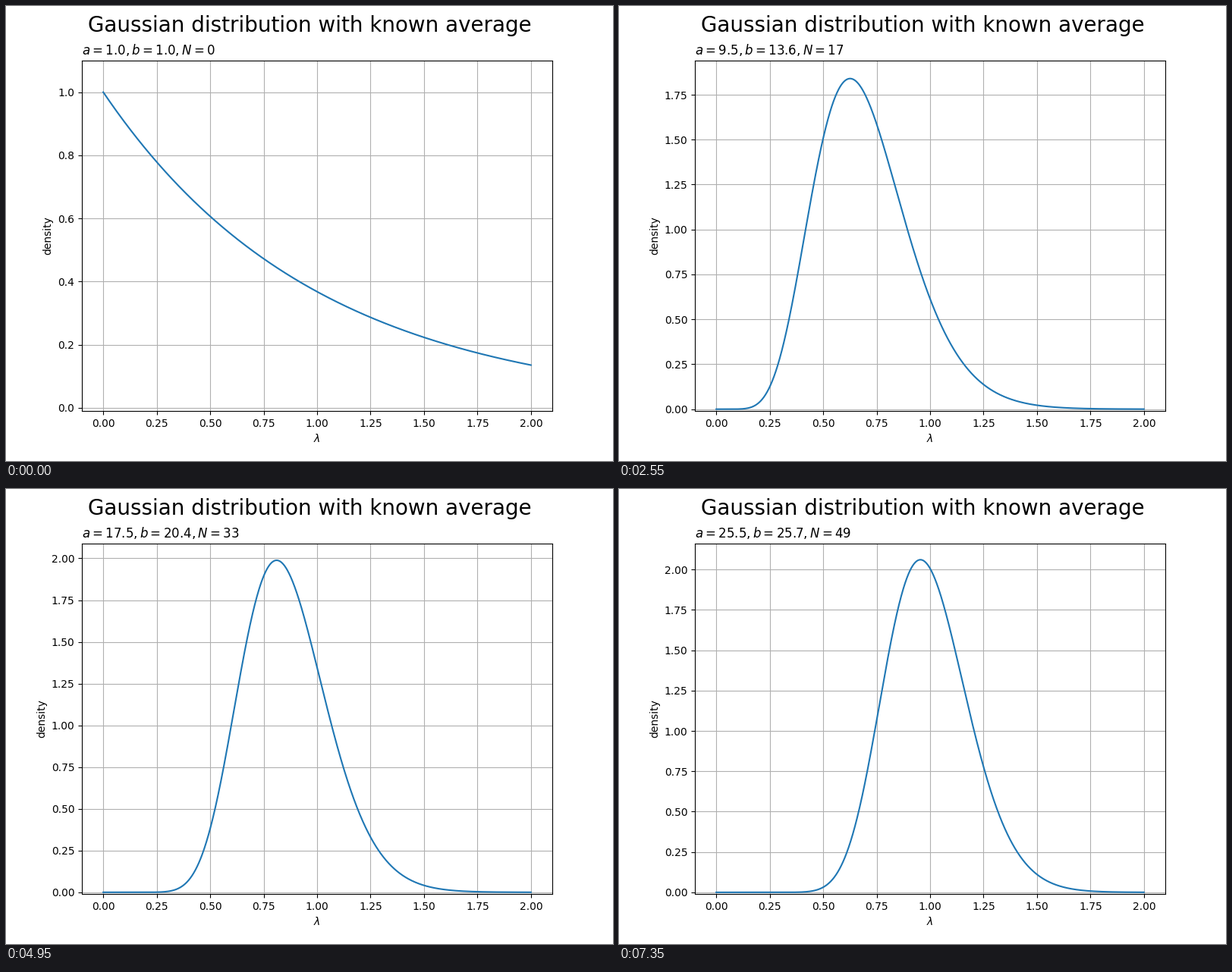
A matplotlib script that plays this animation: 800 by 600 pixels, repeating every 7.5 s.

```python
import math

import matplotlib.pyplot as plt
import numpy as np
from matplotlib.animation import FuncAnimation

STEPS = 50
INTERVAL = 150

# Rate of the gamma posterior over the precision, after N observations
COUNTS = [0, 12, 22, 29, 37, 42, 49]
RATES = [1.0, 12.16, 15.0, 19.53, 21.17, 22.9, 25.66]

lam = np.linspace(0, 2, 1000)


def gamma_pdf(x, a, b):
    return b**a * x**(a - 1) * np.exp(-b * x) / math.gamma(a)


fig, ax = plt.subplots(figsize=(8, 6), dpi=100)
fig.suptitle("Gaussian distribution with known average", fontsize=20)
line, = ax.plot(lam, gamma_pdf(lam, 1, 1))
title = ax.set_title("", loc="left", fontsize=12)
ax.set_xlabel(r"$\lambda$")
ax.set_ylabel("density")
ax.set_xlim(-0.1, 2.1)
ax.grid(True)


def update(n):
    a = 1 + n / 2
    b = np.interp(n, COUNTS, RATES)
    density = gamma_pdf(lam, a, b)
    line.set_ydata(density)
    ax.set_ylim(-0.01, density.max() + 0.1)
    title.set_text(f"$a={a:.1f}, b={b:.1f}, N={n}$")
    return line, title


anim = FuncAnimation(fig, update, frames=STEPS, interval=INTERVAL,
                     repeat=True, repeat_delay=0, blit=False)
plt.show()
```
